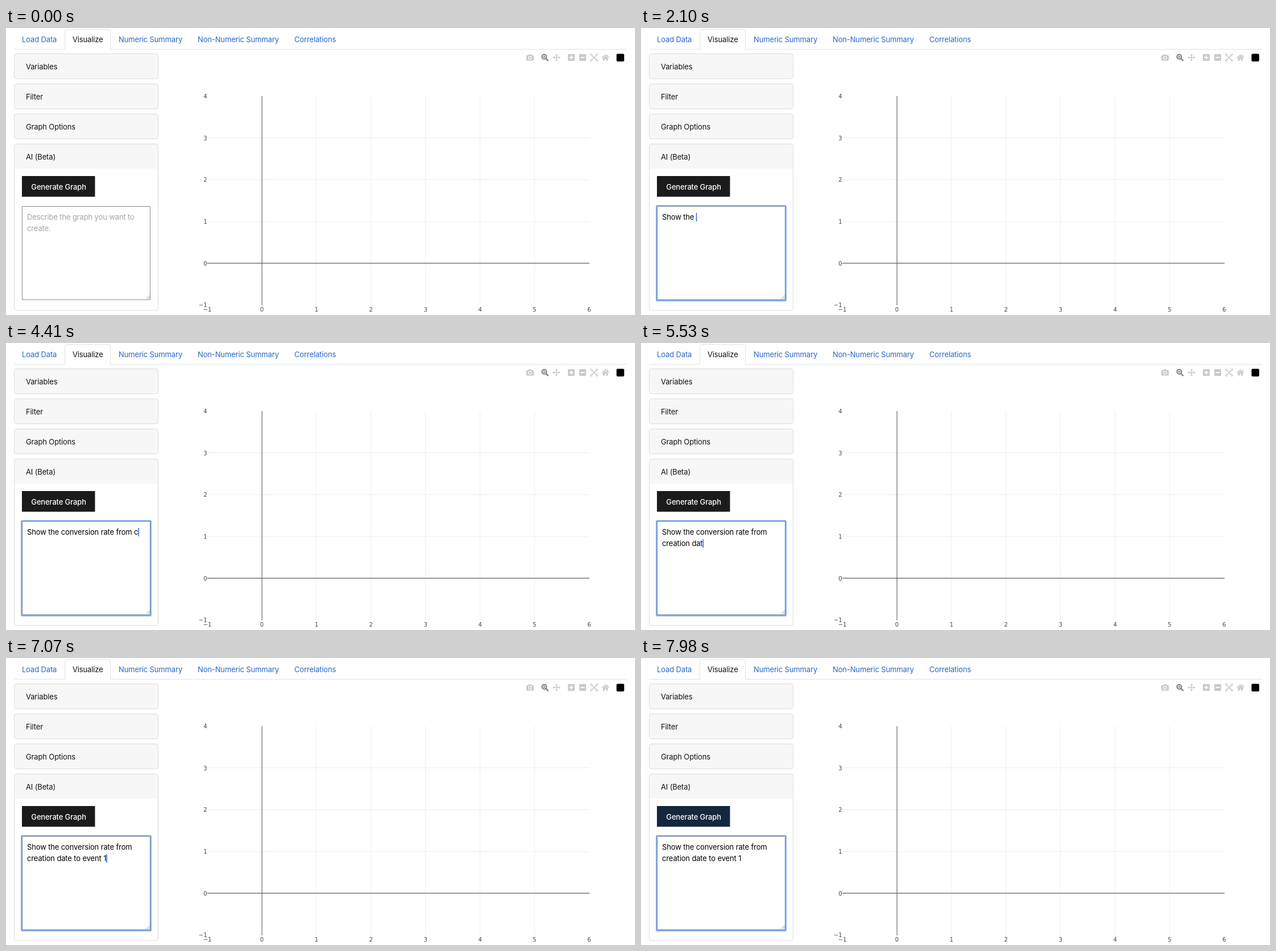
Animation of 1106 by 506 pixels, one loop 8000 ms. Source, as an HTML page with a canvas:

```html
<!DOCTYPE html>
<html lang="en">
<head>
<meta charset="utf-8">
<title>Graph builder</title>
<style>
html, body { margin: 0; width: 100%; height: 100%; overflow: hidden; background: #fff; }
canvas { display: block; width: 1106px; height: 506px; }
</style>
</head>
<body>
<canvas id="stage"></canvas>
<script>
const W = 1106, H = 506, LOOP = 8000, TICK = 70;
const canvas = document.getElementById('stage');
const ctx = canvas.getContext('2d');
const dpr = window.devicePixelRatio || 1;
canvas.width = W * dpr;
canvas.height = H * dpr;

const UI = '13px Inter, sans-serif';
const UI_MEDIUM = '500 13px Inter, sans-serif';
const AXIS = '10px "DejaVu Sans", sans-serif';
const LINK = '#2468cb';

// Bursts of typing: first and last keystroke time, and the characters.
const BURSTS = [
  [1400, 1540, 'Sho'], [1680, 1820, 'w t'],
  [1960, 2940, 'he conversion'],
  [3080, 4060, ' rate from '],
  [4410, 5390, 'creation d'],
  [5460, 5600, 'ate'], [5740, 6440, ' to even'],
  [6580, 6650, 't '],
  [7070, 7070, '1']
];
const KEYS = BURSTS.flatMap(([from, to, chars]) =>
  [...chars].map((char, i) => {
    const at = from + (to - from) * i / Math.max(1, chars.length - 1);
    return { char, at: Math.round(at / TICK) * TICK };
  }));

const clamp = v => Math.min(1, Math.max(0, v));
const ramp = (t, from, to) => clamp((t - from) / (to - from));

function text(str, x, y, color, font = UI, align = 'left') {
  ctx.font = font;
  ctx.letterSpacing = font === AXIS ? '0px' : '-0.14px';
  ctx.textAlign = align;
  ctx.fillStyle = color;
  ctx.fillText(str, x, y);
}

function rect(x, y, w, h, color) {
  ctx.fillStyle = color;
  ctx.fillRect(x, y, w, h);
}

function box(x, y, w, h, r, fill, stroke) {
  ctx.beginPath();
  ctx.roundRect(x, y, w, h, r);
  if (fill) { ctx.fillStyle = fill; ctx.fill(); }
  if (stroke) { ctx.strokeStyle = stroke; ctx.lineWidth = 1; ctx.stroke(); }
}

function lines(color, width, ...paths) {
  ctx.strokeStyle = color;
  ctx.lineWidth = width;
  ctx.beginPath();
  for (const [x, y, ...rest] of paths) {
    ctx.moveTo(x, y);
    for (let i = 0; i < rest.length; i += 2) ctx.lineTo(rest[i], rest[i + 1]);
  }
  ctx.stroke();
}

function shape(color, ...pts) {
  ctx.fillStyle = color;
  ctx.beginPath();
  for (let i = 0; i < pts.length; i += 2) ctx.lineTo(pts[i], pts[i + 1]);
  ctx.fill();
}

function ring(x, y, r, color, width) {
  ctx.strokeStyle = color;
  ctx.lineWidth = width;
  ctx.beginPath();
  ctx.arc(x, y, r, 0, 7);
  ctx.stroke();
}

function drawTabs() {
  lines('#dee2e6', 1, [14, 37.5, 103.5, 37.5], [183.5, 37.5, 1092, 37.5]);
  ctx.strokeStyle = '#dee2e6';
  ctx.beginPath();
  ctx.moveTo(103.5, 38);
  ctx.arcTo(103.5, 2.5, 143, 2.5, 4);
  ctx.arcTo(183.5, 2.5, 183.5, 38, 4);
  ctx.lineTo(183.5, 38);
  ctx.stroke();
  text('Load Data', 28, 24.8, LINK);
  text('Visualize', 117, 24.8, '#111');
  text('Numeric Summary', 198, 24.8, LINK);
  text('Non-Numeric Summary', 337, 24.8, LINK);
  text('Correlations', 507, 24.8, LINK);
}

function drawCards() {
  const edge = '#dcdcdc';
  ['Variables', 'Filter', 'Graph Options'].forEach((name, i) => {
    const y = 45.5 + i * 53;
    box(14.5, y, 253, 44, 4, '#f7f7f7', edge);
    text(name, 35, y + 27.3, '#111');
  });
  box(14.5, 204.5, 253, 293.5, 4, '#fff', null);
  box(14.5, 204.5, 253, 43.5, [4, 4, 0, 0], '#f7f7f7', null);
  box(14.5, 204.5, 253, 293.5, 4, null, edge);
  text('AI (Beta)', 35, 231.6, '#111');
}

function drawIcons() {
  const pale = '#c9c9c9', dark = '#7c7c7c';

  // camera
  box(915, 48, 13, 9.5, 1.5, pale);
  rect(918.5, 46.6, 6, 2, pale);
  ring(921.5, 52.6, 2.7, '#fff', 1.2);

  // zoom
  ring(946.4, 50.8, 4, dark, 2);
  lines(dark, 1.2, [944.2, 50.8, 948.6, 50.8], [946.4, 48.6, 946.4, 53]);
  lines(dark, 2.4, [949.4, 53.8, 953.6, 58]);

  // pan
  lines(pale, 1.4, [963, 52, 973, 52], [968, 47, 968, 57]);
  for (let i = 0; i < 4; i++) {
    ctx.save();
    ctx.translate(968, 52);
    ctx.rotate(i * Math.PI / 2);
    shape(pale, 0, -6.6, 2.5, -3.7, -2.5, -3.7);
    ctx.restore();
  }

  // zoom in and out
  for (const x of [994, 1014]) {
    box(x - 6, 46, 12, 12, 1, pale);
    rect(x - 3.6, 51.1, 7.2, 1.9, '#fff');
  }
  rect(993.05, 48.4, 1.9, 7.2, '#fff');

  // autoscale
  lines(pale, 1.6, [1030.5, 48.5, 1037.5, 55.5], [1037.5, 48.5, 1030.5, 55.5]);
  for (const sx of [-1, 1]) for (const sy of [-1, 1]) {
    const at = (x, y) => [1034 + sx * x, 52 + sy * y];
    lines(pale, 1.2, [...at(3.4, 6.2), ...at(6.2, 6.2), ...at(6.2, 3.4)]);
    shape(pale, ...at(4.8, 4.8), ...at(4.8, 1.8), ...at(1.8, 4.8));
  }

  // home
  lines(pale, 1.5, [1047.8, 52.6, 1054, 47.2, 1060.2, 52.6]);
  rect(1057, 47.4, 1.8, 3.4, pale);
  shape(pale, 1049.6, 53, 1054, 49.2, 1058.4, 53, 1058.4, 57.6,
    1055.2, 57.6, 1055.2, 54.2, 1052.8, 54.2, 1052.8, 57.6, 1049.6, 57.6);

  box(1073.5, 45.5, 13.5, 13.5, 2, '#000');
}

function drawPlot() {
  const px = v => 450 + v * 95.9, py = v => 414.8 - v * 73.7;
  const snap = v => Math.floor(v) + 0.5;
  const grid = '#eeeeee', zero = '#606060';
  const label = v => String(v).replace('-', '\u2212');
  for (let v = 1; v <= 5; v++) lines(grid, 1, [snap(px(v)), 120, snap(px(v)), 489]);
  for (let v = 1; v <= 3; v++) lines(grid, 1, [354, snap(py(v)), 1026, snap(py(v))]);
  lines(zero, 1.1, [450.1, 120, 450.1, 489], [354, 414.6, 1026, 414.6]);
  for (let v = -1; v <= 6; v++) text(label(v), px(v), 499.6, '#444', AXIS, 'center');
  for (let v = -1; v <= 4; v++) text(label(v), 353.5, py(v) + 3.9, '#444', AXIS, 'right');
}

function drawButton(t) {
  const k = ramp(t, 7700, 7980);
  const mix = (a, b) => Math.round(a + (b - a) * k);
  rect(28, 261, 128.5, 36.5, `rgb(${mix(27, 20)},${mix(27, 39)},${mix(27, 61)})`);
  text('Generate Graph', 44.3, 284.6, '#fff', UI_MEDIUM);
}

function caretAlpha(t) {
  if (t < 70) return 0;
  if (t < 1330) return 1 - ramp(t, 840, 1120);
  if (t < 1400) return 0.55;
  return 1 - ramp(t, 7420, 7700);
}

function wrap(str) {
  ctx.font = UI;
  ctx.letterSpacing = '-0.14px';
  const rows = [''];
  for (const word of str.match(/\S+\s*|\s+/g) || []) {
    const row = rows[rows.length - 1] + word;
    if (ctx.measureText(row.trimEnd()).width > 209) rows.push(word);
    else rows[rows.length - 1] = row;
  }
  return rows;
}

function drawInput(t) {
  ctx.globalAlpha = ramp(t, 0, 280);
  box(26, 312.3, 230, 169.7, 2.5, '#86b1ef');
  ctx.globalAlpha = 1;
  box(28.5, 314.5, 225, 164.5, 0, '#fff', t < 70 ? '#8a8a8a' : '#77808f');
  lines('#777', 0.8, [247, 477.5, 253, 471.5], [250.4, 477.5, 253, 474.9]);

  const typed = KEYS.filter(k => k.at <= t).map(k => k.char).join('');
  const rows = wrap(typed);
  const shown = typed ? rows : ['Describe the graph you want to', 'create.'];
  shown.forEach((row, i) => text(row, 37, 338.2 + i * 20, typed ? '#000' : '#a3a3a3'));

  const last = rows.length - 1;
  const x = 37 + ctx.measureText(rows[last]).width;
  ctx.globalAlpha = caretAlpha(t);
  rect(x, 326 + last * 20, 1.5, 15, typed ? '#2a6bd0' : '#5f6f8c');
  ctx.globalAlpha = 1;
}

function draw(now) {
  const t = Math.floor((now % LOOP) / TICK) * TICK;
  ctx.setTransform(dpr, 0, 0, dpr, 0, 0);
  rect(0, 0, W, H, '#fff');
  drawTabs();
  drawCards();
  drawIcons();
  drawPlot();
  drawButton(t);
  drawInput(t);
}

const start = performance.now();
function frame() {
  draw(performance.now() - start);
  requestAnimationFrame(frame);
}
frame();
</script>
</body>
</html>
```
